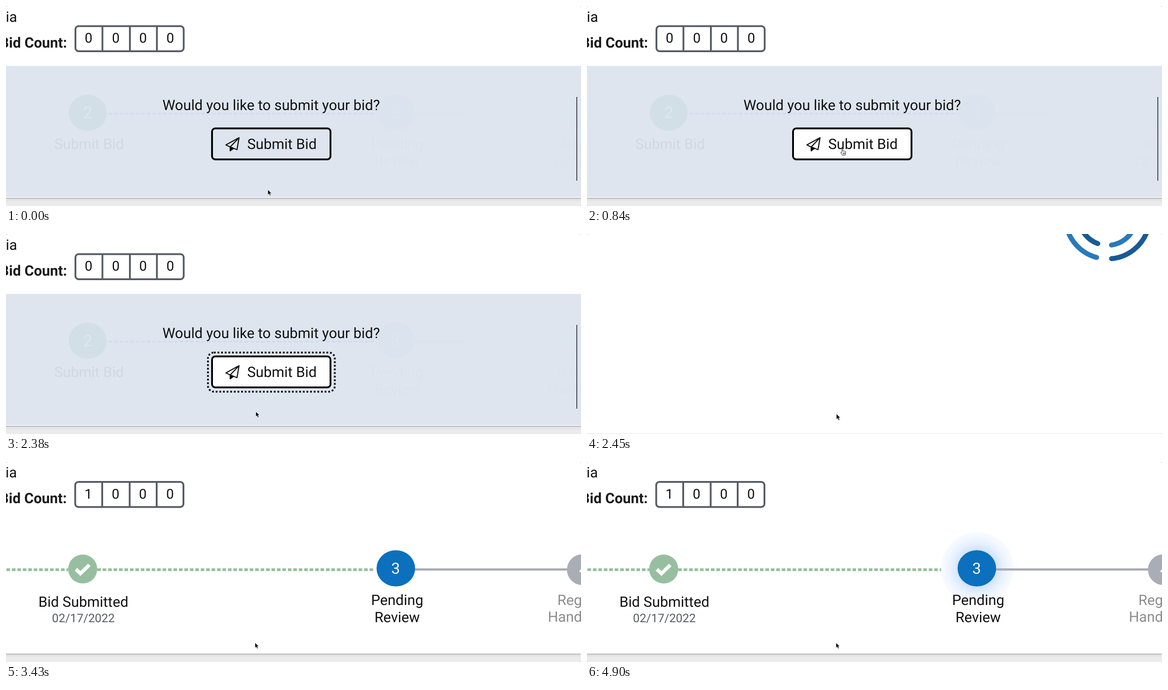
Write an HTML page that moves like this. It is 1267 px wide and 442 px high and loops after 4970 ms.

```html
<!DOCTYPE html>
<html lang="en">
<head>
<meta charset="utf-8">
<title>Submit bid</title>
<style>
  html, body { margin: 0; width: 100%; height: 100%; overflow: hidden; background: #555; }
  svg { display: block; width: 1267px; height: 442px; background: #fff; border-radius: 2px; }
  text { font: 31.7px Roboto, Arial, sans-serif; fill: #111; text-rendering: geometricPrecision; }
  .mid { text-anchor: middle; }
  .num { font-size: 30px; }
  .white { fill: #fff; font-size: 34px; }
  .muted { fill: #8d8d8d; }
</style>
</head>
<body>
<svg viewBox="0 0 1267 442">
  <defs>
    <radialGradient id="glow">
      <stop offset=".5" stop-color="#cfe2fc"/>
      <stop offset=".7" stop-color="#e6f0fe"/>
      <stop offset=".88" stop-color="#f3f8ff"/>
      <stop offset="1" stop-color="#f8fbff"/>
    </radialGradient>
    <linearGradient id="band" x2="0" y2="1">
      <stop stop-color="#dedede"/>
      <stop offset=".5" stop-color="#ebebeb"/>
    </linearGradient>
    <g id="next">
      <path d="M900 237.5H1240" stroke="#a9adb5" stroke-width="5"/>
      <circle cx="1270" cy="238" r="34" fill="#a9adb5"/>
      <text class="white mid" x="1272" y="249">4</text>
      <ellipse cx="859" cy="235" rx="42.5" ry="40" fill="#0b70bd"/>
      <text class="white mid" x="858.5" y="247">3</text>
      <text class="mid" x="862" y="316">Pending</text>
      <text class="mid" x="862" y="354">Review</text>
      <text class="muted" x="1215" y="316">Reg</text>
      <text class="muted" x="1194" y="353">Hand</text>
    </g>
  </defs>

  <g id="page">
    <text x="-.5" y="34.5">ia</text>
    <text x="134.5" y="91.5" text-anchor="end" style="font-weight:700;fill:#1b1b1b">Bid Count:</text>
    <g fill="none" stroke="#565c65" stroke-width="4">
      <rect x="153" y="44.5" width="238.5" height="55.5" rx="7"/>
      <path d="M212.5 44V100M273 44V100M332.5 44V100"/>
    </g>
    <text id="count" class="mid num" x="182" y="81">0</text>
    <text class="mid num" x="242" y="81">0</text>
    <text class="mid num" x="302" y="81">0</text>
    <text class="mid num" x="362" y="81">0</text>
    <rect y="425" width="1267" height="17" fill="url(#band)"/>
    <path d="M0 425H1267" stroke="#b5b6b8" stroke-width="2"/>
  </g>

  <g id="ask">
    <rect y="132.5" width="1267" height="290" fill="#dee5ef"/>
    <use href="#next" opacity=".009"/>
    <path d="M226 238H815" stroke="#d2ddf0" stroke-width="4" stroke-dasharray="8 4"/>
    <ellipse cx="180" cy="236" rx="42" ry="40" fill="#d2dfe7"/>
    <text class="mid" x="180" y="248" style="font-size:36px;fill:#dee6ef">2</text>
    <text class="mid" x="183" y="316" style="fill:#d0d8e1">Submit Bid</text>
    <path d="M1257.7 201V386" stroke="#111" stroke-width="1.5"/>
    <text class="mid" x="584.3" y="230">Would you like to submit your bid?</text>
    <rect id="focus" x="445" y="262" width="279.5" height="86.5" rx="13" fill="none" stroke="#111" stroke-width="4" stroke-dasharray="4"/>
    <rect id="button" x="454" y="270.5" width="261" height="68.5" rx="7" stroke="#000" stroke-width="4"/>
    <g stroke="#111" stroke-width="2.4" stroke-linejoin="round">
      <path d="M513.5 291L484.5 307 494 311.5 509 317.5ZL494 311.5" fill="none"/>
      <path d="M494 311.5V320L501.5 314.5Z"/>
    </g>
    <text x="531.5" y="316">Submit Bid</text>
  </g>

  <g id="loader">
    <g id="rings" transform="translate(1147 -38)" fill="none" stroke-width="11" stroke-linecap="round"></g>
    <path d="M0 441H1267" stroke="#f1f1f1" stroke-width="2"/>
  </g>

  <g id="done">
    <path d="M1 238H137M201 238H812" stroke="#97bf9f" stroke-width="6" stroke-dasharray="8 4"/>
    <circle id="pulse" cx="860" cy="235" fill="url(#glow)"/>
    <circle cx="169" cy="236.5" r="32" fill="#97bf9f"/>
    <path d="M154 237L164 246.5 183.5 227.5" fill="none" stroke="#fff" stroke-width="8"/>
    <text class="mid" x="170.5" y="320">Bid Submitted</text>
    <text class="mid" x="170.5" y="354" style="font-size:26px;fill:#565c65">02/17/2022</text>
    <use href="#next"/>
  </g>

  <g id="cursor">
    <path id="arrow" d="M0 0V11.2L2.6 8.9 4.4 13 6.5 12.1 4.7 8.1H8.2Z" fill="#000" stroke="#fff" stroke-width=".7"/>
    <path id="hand" d="M3.2 9.5V2.2Q4.3 .4 5.4 2.2V6.6Q6.6 5.6 7.4 6.8Q8.6 5.9 9.4 7.2Q11.4 6.6 11.5 8.8V11.5L10.2 16H4.6L.6 10.4Q.6 8.2 3.2 9.5M5.8 10V13.5M7.6 10V13.5M9.4 10V13.5" fill="#fff" stroke="#222" stroke-width="1"/>
  </g>
</svg>
<script>
const LOOP = 4970, STEP = 70, LOAD = 2450, DONE = 3430;
const el = id => document.getElementById(id);
const show = (id, on) => { el(id).style.display = on ? '' : 'none'; };
const clamp = v => Math.max(0, Math.min(1, v));

// Pointer stops: time, x, y
const stops = [
  [70, 577, 406], [630, 566, 344], [700, 562, 325], [840, 558.5, 314],
  [1680, 558.5, 314], [2240, 551, 384], [2380, 550.5, 392.5],
  [2450, 549.5, 397.5], [2660, 548.8, 399.5]
];

// Rings: radius, degrees per second, arcs as [start angle, span, colour]
const light = '#2979bc', dark = '#185a97';
const rings = [
  [93, 68, [[17.5, 67, dark], [105, 67, light]]],
  [63, 84, [[-60, 57, dark], [25, 57, light], [110, 57, dark]]],
  [34, 100, [[16, 57, light]]]
];
const polar = (r, deg) => {
  const a = deg * Math.PI / 180;
  return `${r * Math.cos(a)} ${r * Math.sin(a)}`;
};
el('rings').innerHTML = rings.map(([r, , arcs]) => '<g>' + arcs.map(([a, span, colour]) =>
  `<path stroke="${colour}" d="M${polar(r, a)}A${r} ${r} 0 0 1 ${polar(r, a + span)}"/>`
).join('') + '</g>').join('');

function pointer(t) {
  const i = stops.findIndex(s => s[0] > t);
  if (i < 0) return stops[stops.length - 1].slice(1);
  if (!i) return stops[0].slice(1);
  const a = stops[i - 1], b = stops[i], k = (t - a[0]) / (b[0] - a[0]);
  return [a[1] + (b[1] - a[1]) * k, a[2] + (b[2] - a[2]) * k];
}

function draw(now) {
  const t = Math.floor(now % LOOP / STEP) * STEP;
  const loading = t >= LOAD && t < DONE, done = t >= DONE;
  show('page', !loading);
  show('ask', t < LOAD);
  show('loader', loading);
  show('done', done);

  // The reloaded page sits half a pixel up and left
  el('page').setAttribute('transform', done ? 'translate(-.5 -.5)' : '');
  el('count').textContent = done ? 1 : 0;
  el('button').setAttribute('fill', t >= 700 ? '#fff' : 'none');
  show('focus', t >= 1050);

  rings.forEach(([, speed], i) =>
    el('rings').children[i].setAttribute('transform', `rotate(${speed * (t - LOAD) / 1000})`));

  const grow = clamp((t - 4620) / 280);
  show('pulse', grow > 0);
  el('pulse').setAttribute('r', 42 + 38 * grow);

  const [x, y] = pointer(t), over = t < LOAD && y < 341;
  el('cursor').setAttribute('transform', `translate(${x} ${y}) scale(${loading ? 1.1 : 1})`);
  show('arrow', !over);
  show('hand', over);
  requestAnimationFrame(draw);
}
draw(performance.now());
</script>
</body>
</html>
```
